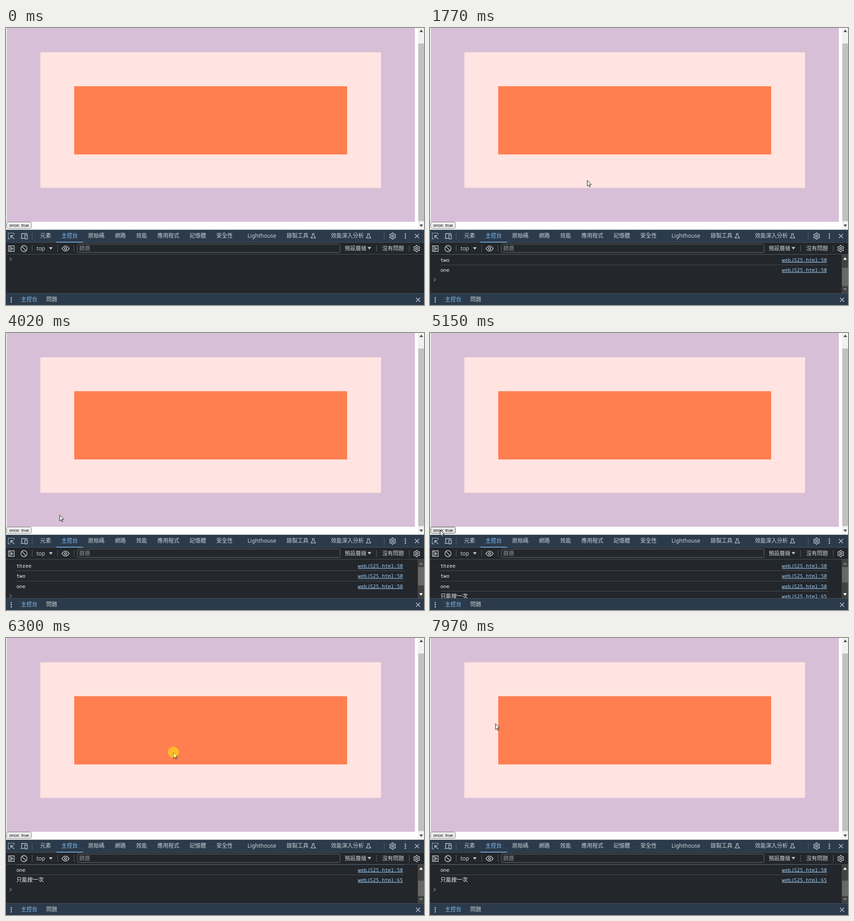
These frames come from a looping animation (919 by 609 pixels, 8 s). An HTML page:

```html
<!DOCTYPE html>
<html lang="zh-Hant">
<head>
<meta charset="utf-8">
<title>Event listener demo</title>
<style>
html, body { margin: 0; width: 100%; height: 100%; overflow: hidden; background: #fff; }
svg { display: block; width: 919px; height: 609px; }
text { font: 12px "Noto Sans", "Noto Sans CJK TC", "Noto Sans CJK", "Noto Sans CJK JP", sans-serif; fill: #c9d0d6; white-space: pre; }
text.on { fill: #82bff6; }
text.dim { fill: #8d9399; }
text.log { font: 500 11px "Noto Sans Mono", "DejaVu Sans Mono", monospace; fill: #f2f4f5; }
text.cjk { font: 12px "Noto Sans CJK TC", "Noto Sans CJK", "Noto Sans CJK JP", sans-serif; }
text.link { fill: #9acbf5; text-decoration: underline; }
text.btn { font: 9.8px "Liberation Sans", Arial, sans-serif; fill: #000; }
.ico { fill: none; stroke: #c5ccd2; stroke-width: 1.4; }
.solid { fill: #c5ccd2; }
.sep { stroke: #566370; stroke-width: 1; }
.edge { stroke: #43525f; }
</style>
</head>
<body>
<svg viewBox="0 0 919 609" xmlns="http://www.w3.org/2000/svg">
  <defs>
    <clipPath id="view"><rect y="498" width="919" height="85.5"/></clipPath>
    <g id="gear"><path id="cog" class="ico" stroke-linejoin="round"/><circle class="ico" r="2.2"/></g>
    <path id="flask" class="ico" d="M-3-5H3M-1.6-5V-1L-5 4.6H5L1.6-1V-5" style="stroke-width:1.2"/>
    <g id="dots" class="solid"><circle cy="-4.6" r="1.5"/><circle r="1.5"/><circle cy="4.6" r="1.5"/></g>
    <path id="cross" class="ico" d="M-4.5-4.5 4.5 4.5M4.5-4.5-4.5 4.5"/>
    <path id="tri" d="M-4-2.5H4L0 3Z"/>
  </defs>

  <!-- page -->
  <rect width="919" height="444" fill="#fff"/>
  <rect x="1.5" width="897.5" height="426" fill="#d8bfd8"/>
  <rect x="75.5" y="53.3" width="749" height="298.2" fill="#ffe4e1"/>
  <rect x="150" y="128" width="600" height="150" fill="#ff7f50"/>
  <rect id="btn" x="1.5" y="426.5" width="54" height="14" rx="2"/>
  <text class="btn" x="7" y="437">once: true</text>
  <rect x="905.5" width="13.5" height="444" fill="#f1f1f1"/>
  <rect x="906.5" y="34" width="12.5" height="390.5" fill="#c1c1c1"/>
  <use href="#tri" transform="translate(913 6.5) scale(1 -1)" fill="#505050"/>
  <use href="#tri" x="913" y="434.5" fill="#505050"/>

  <!-- devtools panels -->
  <rect y="443.5" width="919" height="28" fill="#2c3b4b"/>
  <rect y="471" width="919" height="113" fill="#23262a"/>
  <path class="edge" d="M0 471.5H919M0 497.5H919"/>
  <rect x="110.5" y="470" width="59" height="1.5" fill="#7fbcf5"/>

  <g clip-path="url(#view)">
    <g id="rows"></g>
    <path id="prompt" d="M8-3.8 12 0 8 3.8" fill="none" stroke="#868c92" stroke-width="1.3"/>
    <g id="bar">
      <rect x="905" y="498" width="14" height="86" fill="#424242"/>
      <rect id="thumb" x="906" width="13" fill="#686868"/>
      <use id="up" href="#tri" transform="translate(912.5 507) scale(1 -1)"/>
      <use id="down" href="#tri" x="912.5" y="574.5"/>
    </g>
  </g>

  <rect y="583.5" width="919" height="26" fill="#2c3b4b"/>
  <path class="edge" d="M0 583.5H919"/>
  <g id="labels"></g>

  <!-- icons -->
  <path class="ico" d="M5 462V451H18V455M5 462V464H9" stroke-dasharray="2 1.6"/>
  <path class="ico" d="M18 464 10.5 456.5M10.5 462V456.5H16"/>
  <path class="ico" d="M34.5 461V452H47M32 462.5H40"/>
  <rect class="ico" x="41.5" y="455" width="5.5" height="8.5"/>
  <path class="sep" d="M57.5 450V465M831.5 450V465M57.5 477V492M113.5 477V492M149.5 477V492M814.5 477V492M886.5 477V492"/>
  <use href="#flask" x="675.5" y="457"/>
  <use href="#flask" x="797" y="457"/>
  <use href="#gear" x="850" y="457.5"/>
  <use href="#gear" x="903" y="485"/>
  <use href="#dots" x="878" y="457.5"/>
  <use href="#dots" x="11.5" y="597.5"/>
  <use href="#cross" x="903.5" y="457.5"/>
  <use href="#cross" x="906" y="597.5"/>
  <path class="ico" d="M5.5 479H18V491H5.5ZM9 479V491M12 482.5 15 485 12 487.5Z"/>
  <circle class="ico" cx="39.5" cy="485" r="6.8"/>
  <path class="ico" d="M34.7 480.2 44.3 489.8"/>
  <use href="#tri" x="98.5" y="484.5" class="solid"/>
  <path class="ico" d="M123 485Q131 474 139 485Q131 496 123 485Z"/>
  <circle class="ico" cx="131" cy="485" r="2.4"/>
  <rect x="157" y="475" width="577.5" height="18.5" rx="3" fill="#23262a" stroke="#6d7379"/>
  <text class="dim" x="161" y="489">篩選</text>
  <use href="#tri" x="799" y="484" class="solid"/>

  <!-- pointer -->
  <g id="pointer">
    <path id="arrow" d="M.5.5V13.2L3.3 10.6 5.3 15.3 7.3 14.4 5.3 9.9H9.2Z" fill="#fff" stroke="#111"/>
    <path id="resize" d="M0-8.5 4-4H1.3V4H4L0 8.5-4 4H-1.3V-4H-4Z" fill="#fff" stroke="#111"/>
    <circle id="press" r="12" fill="#ff0" fill-opacity=".47"/>
  </g>
</svg>
<script>
const LOOP = 8000, ROW = 22.3, EM = 12;
const $ = id => document.getElementById(id);
const show = (el, on) => el.setAttribute('visibility', on ? 'inherit' : 'hidden');
const set = (el, attrs) => { for (const k in attrs) el.setAttribute(k, attrs[k]); };
const ramp = (t, a, b) => Math.min(1, Math.max(0, (t - a) / (b - a)));

function add(parent, tag, attrs, content) {
  const el = document.createElementNS('http://www.w3.org/2000/svg', tag);
  set(el, attrs);
  if (content) el.textContent = content;
  return parent.appendChild(el);
}

// labels flow from x with a fixed gap
function row(x, y, gap, names) {
  for (const name of names.split(' ')) {
    add($('labels'), 'text', { x, y, class: name === '主控台' ? 'on' : '' }, name);
    x += name.length * EM + gap;
  }
}
row(75, 461, 22.8, '元素 主控台 原始碼 網路 效能 應用程式 記憶體 安全性');
row(531, 461, 0, 'Lighthouse');
row(617, 461, 49.5, '錄製工具 效能深入分析');
row(67, 489, 0, 'top');
row(744.5, 489, 34.5, '預設層級 沒有問題');
row(33, 601, 19.5, '主控台 問題');

// six teeth, four corners each
$('cog').setAttribute('d', 'M' + Array.from({ length: 24 }, (_, i) => {
  const r = i % 4 < 2 ? 7 : 5.2, a = (i - .5) * Math.PI / 12 - Math.PI / 2;
  return `${r * Math.cos(a)} ${r * Math.sin(a)}`;
}).join('L') + 'Z');

const logs = ['three', 'two', 'one', '只能按一次'].map((msg, i) => {
  const g = add($('rows'), 'g', {}), mid = 512 + ROW * i, once = i === 3;
  if (i) add(g, 'path', { d: `M23 ${Math.round(mid - 12) + .5}H876`, stroke: '#4a5157' });
  add(g, 'text', { x: 23, y: mid + 4, class: once ? 'log cjk' : 'log' }, msg);
  add(g, 'text', { x: 773.6, y: mid + 4, class: 'log link' }, 'webJS25.html:' + (once ? 65 : 50));
  return g;
});

// pointer stops: arrival, rest, position, pressed while resting
const stops = [
  [370, 0, 881, 242], [530, 0, 640, 202], [690, 140, 462, 214, true],
  [1630, 70, 348, 248, true], [1770, 0, 345.5, 334], [2030, 120, 320, 378, true],
  [2630, 210, 347, 227, true], [2970, 0, 359, 443], [3500, 200, 366, 562],
  [4020, 0, 118, 400], [4410, 210, 22, 433], [4620, 130, 22, 433, true], [5150, 30, 22, 433],
  [5680, 140, 301, 556], [6230, 140, 368, 251, true], [6570, 60, 344, 307, true],
  [7090, 140, 20, 430, true], [7970, 30, 143.5, 188]
].map(([at, rest, x, y, press]) => ({ at, rest, end: at + rest, x, y, press }));

// still at rests, smooth through the other stops
function speed(i, axis) {
  const a = stops[i - 1], b = stops[i + 1];
  return stops[i].rest || !a || !b ? 0 : (b[axis] - a[axis]) / (b.at - a.end);
}

function place(i, axis, t) {
  const a = stops[i], b = stops[i + 1];
  if (!b || t <= a.end) return a[axis];
  const d = b.at - a.end, p = (t - a.end) / d, q = 1 - p;
  return a[axis] * q * q * (1 + 2 * p) + b[axis] * p * p * (1 + 2 * q)
    + d * p * q * (speed(i, axis) * q - speed(i + 1, axis) * p);
}

function draw(t) {
  const count = t < 830 ? 0 : t < 4690 ? 3 : 4;
  const scroll = count && 24.5 * (1 - ramp(t, 3230, 3430)) + 47 * ramp(t, 5450, 5600);
  logs.forEach((g, i) => show(g, i < count));
  $('rows').setAttribute('transform', `translate(0 ${-scroll})`);
  $('prompt').setAttribute('transform', `translate(0 ${count ? 511 + ROW * count - scroll : 508})`);

  const few = count < 4, off = '#7d7d7d';
  show($('bar'), count);
  set($('thumb'), { y: 514.5 + scroll * (few ? .51 : .4), height: few ? 40.5 : 34 });
  set($('up'), { fill: scroll > 1 ? '#fff' : off });
  set($('down'), { fill: scroll > 1 ? off : '#fff' });

  const i = Math.max(0, stops.findLastIndex(s => s.at <= t));
  const x = place(i, 'x', t), y = place(i, 'y', t);
  const seen = t >= stops[0].at, edge = x > 60 && y > 438 && y < 449;
  const down = stops[i].press && t < stops[i].end;
  const hover = seen && x < 56 && y > 426 && y < 441;
  show($('pointer'), seen);
  show($('arrow'), seen && !edge);
  show($('resize'), seen && edge);
  show($('press'), seen && down);
  $('pointer').setAttribute('transform', `translate(${x} ${y})`);
  set($('btn'), {
    fill: !hover ? '#efefef' : down ? '#f5f5f5' : '#e5e5e5',
    stroke: hover && !down ? '#4f4f4f' : '#767676'
  });
}

const start = performance.now();
function tick() {
  draw((performance.now() - start) % LOOP);
  requestAnimationFrame(tick);
}
tick();
</script>
</body>
</html>
```
